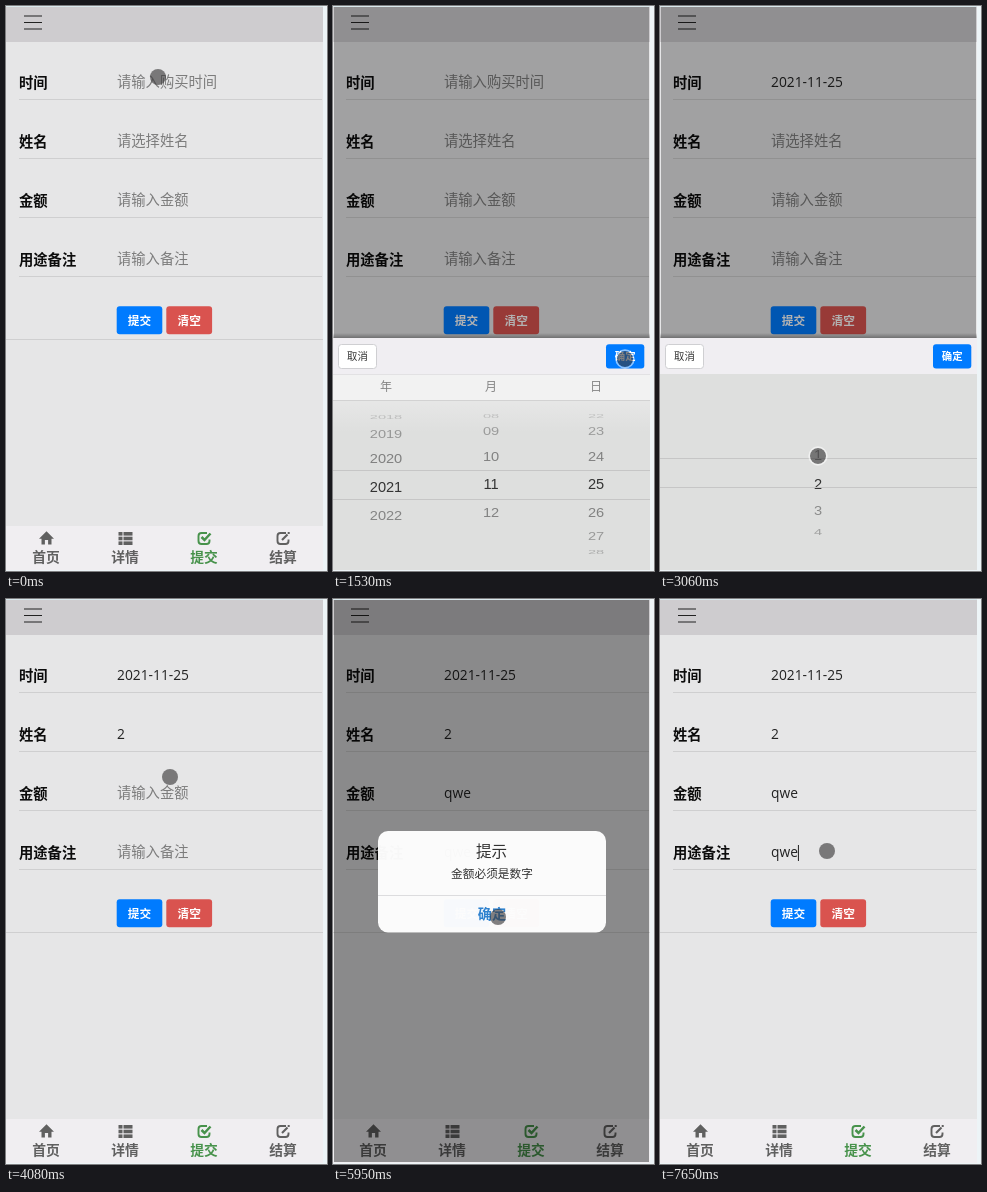
These frames come from a looping animation (321 by 565 pixels, 7990 ms). An HTML page with a canvas:

```html
<!DOCTYPE html>
<html lang="zh-CN">
<head>
<meta charset="utf-8">
<title>记账表单</title>
<style>
  html, body { margin: 0; width: 100%; height: 100%; overflow: hidden; background: #edf4f7; }
  canvas { display: block; width: 321px; height: 565px; }
</style>
</head>
<body>
<canvas id="stage"></canvas>
<script>
const W = 321, H = 565, LOOP = 7990, RIGHT = 317;
const CJK = '"Noto Sans CJK SC", "Noto Sans CJK", sans-serif';
const LATIN = '"Open Sans", "Noto Sans CJK SC", sans-serif';
const DIGITS = '"Liberation Sans", Arial, sans-serif';

const canvas = document.getElementById('stage');
const c = canvas.getContext('2d');
const dpr = window.devicePixelRatio || 1;
canvas.width = W * dpr;
canvas.height = H * dpr;

// Each step holds until the next: time, pointer x, pointer y, changed state
const steps = [
  [0, 152, 71, { time: '', name: '', amount: '', note: '', shade: 0, sheet: null, dialog: 0, focus: '' }],
  [170, 153, 73, { shade: .3, sheet: 'date', top: 480, year: 2017 }],
  [510, 170, 130, { top: 390 }],
  [680, 179, 171, { top: 351 }],
  [1190, 66, 490, { top: 332, year: 2018.4 }],
  [1360, 66, 440, { year: 2020.6 }],
  [1530, 292, 353, { year: 2020.9 }],
  [1700, 282, 345, { time: '2021-11-25', shade: 0, sheet: null }],
  [2040, 165, 145, {}],
  [2210, 157, 138, { shade: .3, sheet: 'name', top: 466, pick: 1 }],
  [2550, 160, 300, { top: 332 }],
  [2890, 158, 468, {}],
  [3060, 158, 450, { pick: 1.6 }],
  [3400, 160, 440, { pick: 2 }],
  [3910, 292, 354, {}],
  [4080, 164, 178, { name: '2', shade: 0, sheet: null }],
  [4590, 164, 192, { amount: 'qwe', focus: 'amount' }],
  [5100, 165, 240, { focus: 'note' }],
  [5270, 165, 252, { note: 'qwe' }],
  [5950, 165, 318, { focus: '', shade: .4, dialog: 1 }],
  [6630, 165, 318, { shade: .1, dialog: .25 }],
  [6800, 167, 252, { shade: 0, dialog: 0 }],
  [7650, 167, 252, { focus: 'note' }]
];

function stateAt(t) {
  const s = {};
  for (const [at, x, y, change] of steps) {
    if (at > t) break;
    Object.assign(s, change, { x, y });
  }
  return s;
}

function rect(x, y, w, h, fill) {
  c.fillStyle = fill;
  c.fillRect(x, y, w, h);
}

function rounded(x, y, w, h, r, fill, stroke) {
  c.beginPath();
  c.roundRect(x, y, w, h, r);
  if (fill) { c.fillStyle = fill; c.fill(); }
  if (stroke) { c.strokeStyle = stroke; c.stroke(); }
}

function fade(y0, y1, from, to) {
  const g = c.createLinearGradient(0, y0, 0, y1);
  g.addColorStop(0, from);
  g.addColorStop(1, to);
  rect(0, y0, RIGHT, y1 - y0, g);
}

// y is the optical middle of the line
function text(str, x, y, size, color, { weight = 400, align = 'left', family = CJK } = {}) {
  c.font = `${weight} ${size}px ${family}`;
  c.textAlign = align;
  c.fillStyle = color;
  c.fillText(str, x, y + size * .37);
  return c.measureText(str).width;
}

function poly(points, close) {
  c.beginPath();
  points.forEach(([x, y]) => c.lineTo(x, y));
  if (close) c.closePath();
}

function button(label, x, y, w, h, size, fill, color, weight, border) {
  rounded(x, y, w, h, 3, fill, border);
  text(label, x + w / 2, y + h / 2, size, color, { weight, align: 'center' });
}

const icons = {
  home() {
    poly([[-7.5, .8], [0, -6.7], [7.5, .8], [5, .8], [5, 6.5], [1.6, 6.5], [1.6, 2], [-1.6, 2], [-1.6, 6.5], [-5, 6.5], [-5, .8]], true);
    c.fill();
  },
  list() {
    for (let y = -6; y <= 4; y += 4.7) {
      c.fillRect(-7, y, 4, 3.6);
      c.fillRect(-2, y, 9, 3.6);
    }
  },
  box() {
    c.lineWidth = 1.9;
    c.beginPath();
    c.moveTo(2.5, -5);
    c.lineTo(-3, -5);
    c.quadraticCurveTo(-6, -5, -6, -2);
    c.lineTo(-6, 3);
    c.quadraticCurveTo(-6, 6, -3, 6);
    c.lineTo(2, 6);
    c.quadraticCurveTo(5, 6, 5, 3);
    c.lineTo(5, 1.5);
    c.stroke();
  },
  check() {
    icons.box();
    c.lineWidth = 2.5;
    poly([[-3, -1], [0, 2], [6, -4.5]]);
    c.stroke();
  },
  edit() {
    icons.box();
    c.lineWidth = 2.2;
    poly([[-1.5, 2], [4, -3.5]]);
    c.stroke();
    c.fillRect(4.2, -6, 2, 2);
  }
};

const fields = [
  ['time', '时间', '请输入购买时间'],
  ['name', '姓名', '请选择姓名'],
  ['amount', '金额', '请输入金额'],
  ['note', '用途备注', '请输入备注']
];
const tabs = [['home', '首页'], ['list', '详情'], ['check', '提交'], ['edit', '结算']];

function drawForm(s) {
  rect(0, 1, RIGHT, 563, '#e6e6e7');
  rect(0, 1, RIGHT, 35, '#cecccf');
  for (const y of [9.5, 16, 22.5]) rect(18, y, 18, 1, '#222');

  fields.forEach(([key, label, hint], i) => {
    const y = 76 + i * 59;
    text(label, 13, y + .5, 14.3, '#0c0c0c', { weight: 700 });
    const w = s[key]
      ? text(s[key], 111, y, 13.8, '#222', { family: LATIN })
      : text(hint, 111, y, 14.3, '#7c7c7c');
    if (s.focus === key) rect(111 + (s[key] ? w : 0), y - 7, 1, 16, '#222');
    rect(13, y + 17, RIGHT - 14, 1, '#cfcfd0');
  });

  button('提交', 110.7, 300.2, 45.6, 28, 11.7, '#007bff', '#fff', 700);
  button('清空', 160.3, 300.2, 45.8, 28, 11.7, '#d9534f', '#fff', 700);
  rect(0, 333, RIGHT, 1, '#cfcfd0');
}

function drawTabs() {
  rect(0, 520, RIGHT, 44, '#f0eef1');
  tabs.forEach(([icon, label], i) => {
    const x = 40 + i * 79, color = icon === 'check' ? '#47924b' : '#606060';
    c.save();
    c.translate(x + .5, 532);
    c.fillStyle = c.strokeStyle = color;
    icons[icon]();
    c.restore();
    text(label, x, 550.5, 13.8, color, { weight: 700, align: 'center' });
  });
}

// Items sit on a cylinder seen from the front
function drawWheel(x, cy, value, min, max, pad) {
  for (let n = min; n <= max; n++) {
    const a = (n - value) * .4, d = Math.abs(a);
    if (d > 1.35) continue;
    c.save();
    c.translate(x, cy + 73 * Math.sin(a));
    c.scale(1, Math.cos(a));
    c.globalAlpha = d < .2 ? 1 : Math.max(.12, .72 - d * .34);
    text(String(n).padStart(pad, '0'), 0, 0, 14.6, d < .2 ? '#333' : '#404040', { align: 'center', family: DIGITS });
    c.restore();
  }
}

function drawSheet(s) {
  const top = s.top, dated = s.sheet === 'date';
  const head = top + (dated ? 62 : 36);
  const mid = top + (dated ? 146 : 134);

  fade(top - 5, top, 'rgba(0,0,0,0)', 'rgba(0,0,0,.3)');
  rect(0, top, RIGHT, 36, '#f0eef2');
  button('取消', 5.5, top + 6.5, 38, 24, 10.4, '#fff', '#333', 400, '#cfcfd2');
  button('确定', 273, top + 6.3, 38.3, 24.3, 10.4, '#007bff', '#fff', 700);

  rect(0, head, RIGHT, 564 - head, '#dedfde');
  if (dated) {
    rect(0, top + 36, RIGHT, 26, '#f2f2f2');
    rect(0, top + 36, RIGHT, 1, '#e2e1e3');
    ['年', '月', '日'].forEach((unit, i) =>
      text(unit, 53 + i * 105, top + 49, 12, '#858585', { align: 'center' }));
    rect(0, head, RIGHT, 1, '#d2d2d2');
  }

  c.save();
  c.beginPath();
  c.rect(0, head + 1, RIGHT, 561 - head);
  c.clip();
  if (dated) {
    drawWheel(53, mid, s.year, 2010, 2022, 4);
    drawWheel(158, mid, 11, 1, 12, 2);
    drawWheel(263, mid, 25, 1, 30, 2);
    fade(head + 1, head + 32, 'rgba(236,236,236,.6)', 'rgba(236,236,236,0)');
  } else {
    drawWheel(158, mid, s.pick, 1, 4, 1);
  }
  rect(0, mid - 14, RIGHT, 1, '#c6c6c6');
  rect(0, mid + 15, RIGHT, 1, '#c6c6c6');
  c.restore();
}

function drawDialog(alpha) {
  c.save();
  c.globalAlpha = alpha;
  rounded(45, 232, 228, 101.5, 10, 'rgba(255,255,255,.97)');
  text('提示', 158.5, 252, 15.6, '#333', { align: 'center' });
  text('金额必须是数字', 159, 274.5, 11.7, '#333', { align: 'center' });
  rect(45, 296, 228, 1, '#dcdcde');
  text('确定', 159, 315, 14.2, '#2f82cf', { weight: 700, align: 'center' });
  c.restore();
}

function drawPointer(x, y, ringed) {
  c.beginPath();
  c.arc(x, y, 8, 0, Math.PI * 2);
  c.fillStyle = 'rgba(60,58,60,.64)';
  c.fill();
  if (!ringed) return;
  c.beginPath();
  c.arc(x, y, 8.9, 0, Math.PI * 2);
  c.lineWidth = 1.6;
  c.strokeStyle = 'rgba(255,255,255,.55)';
  c.stroke();
  c.lineWidth = 1;
}

function draw(t) {
  const s = stateAt(t);
  c.setTransform(dpr, 0, 0, dpr, 0, 0);
  c.lineWidth = 1;
  rect(0, 0, W, H, '#edf4f7');
  rect(0, 0, RIGHT, 1, '#d9e8ec');
  drawForm(s);
  drawTabs();
  if (s.shade) rect(1, 1, RIGHT - 2, 562, `rgba(0,0,0,${s.shade})`);
  if (s.sheet) drawSheet(s);
  if (s.dialog) drawDialog(s.dialog);
  drawPointer(s.x, s.y, s.sheet);
}

const start = performance.now();
function tick() {
  draw((performance.now() - start) % LOOP);
  requestAnimationFrame(tick);
}
tick();
</script>
</body>
</html>
```
